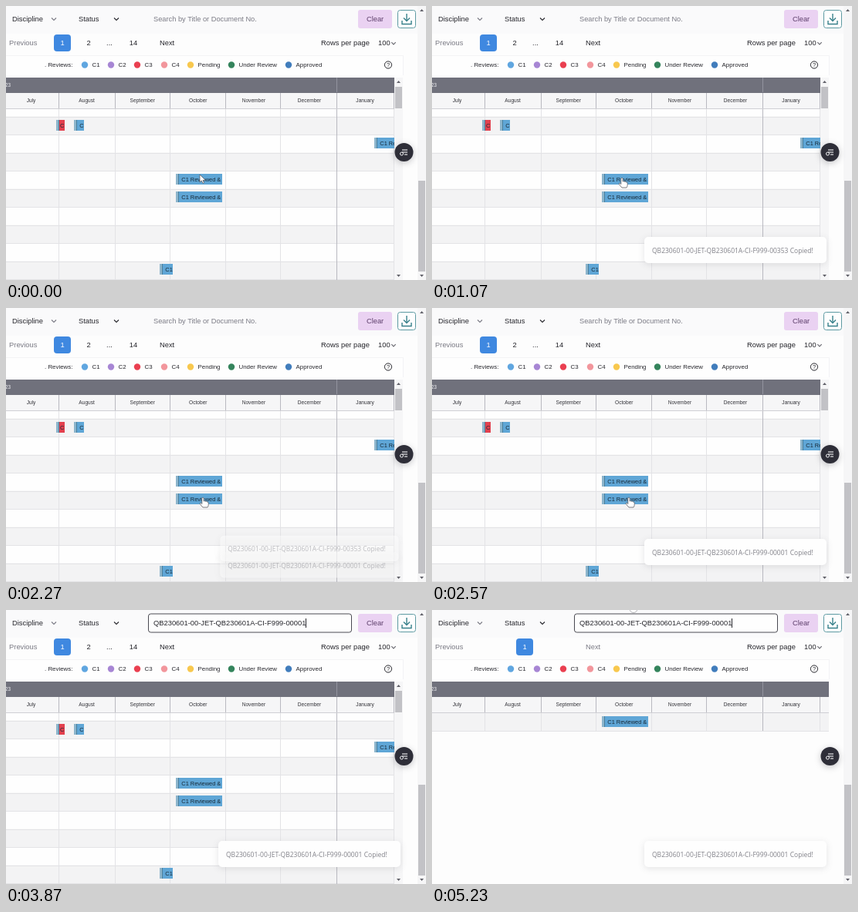
Recreate the animation shown at these times as an HTML page with a canvas. Size 544 by 356 pixels, loop 5260 ms.

```html
<!DOCTYPE html>
<html lang="en">
<head>
<meta charset="utf-8">
<title>Document schedule</title>
<style>
html, body { margin: 0; width: 100%; height: 100%; overflow: hidden; background: #fdfdfd; }
canvas { display: block; }
</style>
</head>
<body>
<canvas id="stage" width="544" height="356"></canvas>
<script>
const ctx = document.getElementById('stage').getContext('2d');
const LOOP = 5260, FOCUS = 3500, PASTE = 3850, RESULTS = 4830;
const SANS = '"Liberation Sans", Arial, sans-serif';
const TOAST = '"Open Sans", "Noto Sans", sans-serif';
const DOC = 'QB230601-00-JET-QB230601A-CI-F999-';
const PAPER = '#fdfdfd', TINT = '#f3f3f4', LINE = '#e3e3e6', EDGE = '#b9b9c0';
const INK = '#26262c', MUTED = '#7b7b85', BLUE = '#5fa6d6';
const COLUMNS = [68, 141, 212, 284, 355, 428, 502];
const MONTHS = ['July', 'August', 'September', 'October', 'November', 'December', 'January'];
const LEGEND = [
  ['C1', 102, '#60a6e0'], ['C2', 136, '#a786d4'], ['C3', 170, '#ea3f50'],
  ['C4', 205, '#f2969c'], ['Pending', 239, '#f8c84e'],
  ['Under Review', 292, '#34845c'], ['Approved', 366, '#417dbc']
];
// time, x, y, shape (kept until the next entry)
const POINTER = [
  [0, 251, 219, 'arrow'], [60, 251, 219, 'arrow'], [350, 246, 223, 'hand'],
  [1500, 246, 223, 'hand'], [2000, 255, 246, 'hand'], [2650, 255, 246, 'arrow'],
  [3100, 300, 17, ''], [4250, 335, 17, 'arrow'], [4520, 402, 77, 'arrow'],
  [4650, 402, 77, 'arrow'], [4830, 261, -18, '']
];

const clamp = v => Math.max(0, Math.min(1, v));
const ease = v => { v = clamp(v); return v * v * (3 - 2 * v); };

function rect(x, y, w, h, fill) {
  ctx.fillStyle = fill;
  ctx.fillRect(x, y, w, h);
}

function box(x, y, w, h, r, fill, stroke, width = 1) {
  ctx.beginPath();
  ctx.roundRect(x, y, w, h, r);
  if (fill) { ctx.fillStyle = fill; ctx.fill(); }
  if (stroke) { ctx.strokeStyle = stroke; ctx.lineWidth = width; ctx.stroke(); }
}

function line(points, color, width = 1) {
  ctx.beginPath();
  points.forEach(([x, y]) => ctx.lineTo(x, y));
  ctx.strokeStyle = color;
  ctx.lineWidth = width;
  ctx.stroke();
}

function dot(x, y, r, fill, stroke) {
  ctx.beginPath();
  ctx.arc(x, y, r, 0, 7);
  if (fill) { ctx.fillStyle = fill; ctx.fill(); }
  if (stroke) { ctx.strokeStyle = stroke; ctx.lineWidth = 1; ctx.stroke(); }
}

// y is the middle of the capitals
function text(str, x, y, size = 9.35, color = INK, align = 'left', font = SANS) {
  ctx.font = `${size}px ${font}`;
  ctx.textAlign = align;
  ctx.fillStyle = color;
  ctx.fillText(str, x, y + size * 0.36);
}

function chevron(x, y, color = INK, s = 3) {
  line([[x - s, y - s / 2], [x, y + s / 2], [x + s, y - s / 2]], color, 1.1);
}

function triangle(x, y, dir) {
  ctx.beginPath();
  ctx.moveTo(x - 2.5, y + dir);
  ctx.lineTo(x + 2.5, y + dir);
  ctx.lineTo(x, y - 2 * dir);
  ctx.fillStyle = '#606068';
  ctx.fill();
}

function scrollbar(x, w, top, thumb, height) {
  rect(x, top, w, 356 - top, '#f6f6f7');
  rect(x + 1, thumb, w - 2, height, '#c2c2c6');
  triangle(x + w / 2, top + 6, 1);
  triangle(x + w / 2, 350, -1);
}

function toolbar(t) {
  rect(0, 0, 533, 36, '#fafafb');
  text('Discipline', 8, 17);
  chevron(62, 17, MUTED);
  text('Status', 94, 17);
  chevron(143, 17);
  if (t >= FOCUS) box(184.5, 5, 263, 24, 3, '#fefefe', '#4a4a52');
  if (t >= PASTE) {
    text(DOC + '00001', 191, 17, 9.35);
    rect(388, 11, 1, 12, INK);
  } else {
    text('Search by Title or Document No.', 191, 17, 9.25, MUTED);
    if (t >= FOCUS) rect(190, 11, 1, 12, INK);
  }
  box(456, 5, 44, 24, 3, '#ead2f2');
  text('Clear', 467, 17, 9.3, '#5e3f6c');
  box(507.5, 5.5, 23, 23, 3, '#fefefe', '#5d9aa2');
  line([[519, 10], [519, 19]], '#37808a', 1.4);
  line([[515, 15.5], [519, 19.5], [523, 15.5]], '#37808a', 1.4);
  line([[513, 19], [513, 23.5], [525, 23.5], [525, 19]], '#37808a', 1.4);
}

function pager(found) {
  text('Previous', 4, 48, 9.4, MUTED);
  box(found ? 109 : 62, 37, 22, 22, 4, '#3f88e0');
  text('1', found ? 120 : 73, 48, 9.35, '#fff', 'center');
  if (!found) {
    text('2', 107, 48, 9.35, INK, 'center');
    text('...', 134, 48, 9.35, INK, 'center');
    text('14', 165, 48, 9.35, INK, 'center');
  }
  text('Next', 199, 48, 9.35, found ? MUTED : INK);
  text('Rows per page', 408, 48);
  text('100', 482, 48);
  chevron(502, 48.5, '#66666e', 2.7);
}

function legend() {
  rect(0, 64, 514, 26, '#fefefe');
  line([[0, 64.5], [514.5, 64.5], [514.5, 90]], '#f3f3f5');
  text('. Reviews:', 50, 76, 7.9);
  for (const [label, x, color] of LEGEND) {
    dot(x, 76.5, 4.2, color);
    text(label, x + 9.5, 76.5, 7.9);
  }
  dot(495, 76.5, 4.6, '', INK);
  text('?', 495, 76.5, 7.5, INK, 'center');
}

function bar(x, y, w, label, color = BLUE, pad = 7.3) {
  ctx.save();
  ctx.beginPath();
  ctx.rect(x, y - 7, w, 14);
  ctx.clip();
  rect(x, y - 7, w, 14, color);
  rect(x, y - 7, 3, 14, '#8db5cc');
  rect(x + 3, y - 7, 1, 14, '#4a7f9c');
  text(label, x + pad, y, 7.4, '#182a38');
  ctx.restore();
}

function table(found) {
  const right = found ? 514 : 503, bottom = found ? 157 : 356;
  rect(0, 93, right, 20, '#70717c');
  line([[428.5, 93], [428.5, 112]], '#93949e');
  text('23', -1, 103, 6.3, '#f5f5f8');
  rect(0, 113, right, 20, '#f6f6f7');
  if (found) rect(0, 133, right, 24, TINT);
  else for (let i = -1; i < 10; i++) {
    const y = 143.5 + i * 23.5;
    rect(0, Math.max(133, y), right, 23.5, i % 2 ? '#fefefe' : TINT);
    if (y > 133) rect(0, Math.round(y), right, 1, LINE);
  }
  for (const x of COLUMNS) {
    rect(x, 113, 1, bottom - 113, x === 428 ? EDGE : LINE);
    rect(x, 113, 1, 20, EDGE);
  }
  rect(0, 133, right, 1, '#cfcfd4');
  if (found) rect(0, 157, right, 1, LINE);
  MONTHS.forEach((m, i) => text(m, 32.5 + i * 72.1, 123, 6.6, '#34343a', 'center'));

  if (found) {
    bar(220, 145, 60, 'C1 Reviewed &');
    return;
  }
  bar(65, 155, 11, 'C', '#e2404e', 5);
  bar(88, 155, 13, 'C');
  bar(477, 178, 26, 'C1 Reviewed &');
  bar(220, 225, 60, 'C1 Reviewed &');
  bar(220, 248, 60, 'C1 Reviewed &');
  bar(199, 342, 17, 'C1');
  scrollbar(503, 11, 93, 105, 28);
}

function menuButton() {
  ctx.save();
  ctx.shadowColor = '#50505a55';
  ctx.shadowBlur = 8;
  ctx.shadowOffsetY = 2;
  dot(515.5, 190, 12, '#2e2e38');
  ctx.restore();
  for (const y of [187, 190, 193]) line([[y > 190 ? 516 : 513, y], [520, y]], '#f4f4f6', 1.1);
  dot(512.5, 192, 2, '', '#f4f4f6');
}

function toast(number, alpha, dy, scale) {
  if (alpha <= 0) return;
  ctx.save();
  ctx.globalAlpha = alpha;
  ctx.translate(393, 317 + dy);
  ctx.scale(scale, scale);
  ctx.shadowColor = '#60606828';
  ctx.shadowBlur = 9;
  ctx.shadowOffsetY = 2;
  box(-118, -17, 236, 34, 5, '#fefefe');
  ctx.shadowColor = 'transparent';
  text(`${DOC}${number} Copied!`, -108, 1, 8.5, '#808088', 'left', TOAST);
  ctx.restore();
}

function toasts(t) {
  const first = clamp((t - 850) / 200), swap = clamp((t - 2170) / 200);
  toast('00001', swap, 34 * (1 - swap), 0.96 + 0.04 * swap);
  toast('00353', first * (1 - swap), 34 * (1 - first) - 9 * swap, 0.96 + 0.04 * first - 0.04 * swap);
}

const ARROW = new Path2D('M0 0V10L2.3 7.9L4 11.4L5.6 10.6L4.1 7.3H7.3Z');
const HAND = new Path2D('M-1.2 1Q0 -1 1.2 1V5Q3 4 3.6 5.4Q5 4.6 5.7 6Q7.2 5.6 7.2 7.5V9.5Q7.2 11.5 6 13H0Q-2 11-3.6 8.6Q-4 7-2.6 7.2L-1.2 8.5Z');

function pointer(t) {
  const i = POINTER.findLastIndex(p => p[0] <= t);
  const [t0, x0, y0, shape] = POINTER[i];
  if (!shape) return;
  const [t1, x1, y1] = POINTER[i + 1];
  const k = ease((t - t0) / (t1 - t0));
  const path = shape === 'hand' ? HAND : ARROW;
  ctx.save();
  ctx.translate(x0 + (x1 - x0) * k, y0 + (y1 - y0) * k);
  ctx.fillStyle = '#fff';
  ctx.strokeStyle = '#5c5c64';
  ctx.lineWidth = 0.8;
  ctx.fill(path);
  ctx.stroke(path);
  ctx.restore();
}

function draw(now) {
  const t = now % LOOP, found = t >= RESULTS;
  rect(0, 0, 544, 356, PAPER);
  toolbar(t);
  pager(found);
  legend();
  table(found);
  scrollbar(533, 11, 0, 227, 118);
  menuButton();
  toasts(t);
  pointer(t);
  if (found) dot(261, -1.5, 5, '#fefefe', '#b4b4b8');
}

const start = performance.now();
function tick() {
  draw(performance.now() - start);
  requestAnimationFrame(tick);
}
tick();
</script>
</body>
</html>
```
